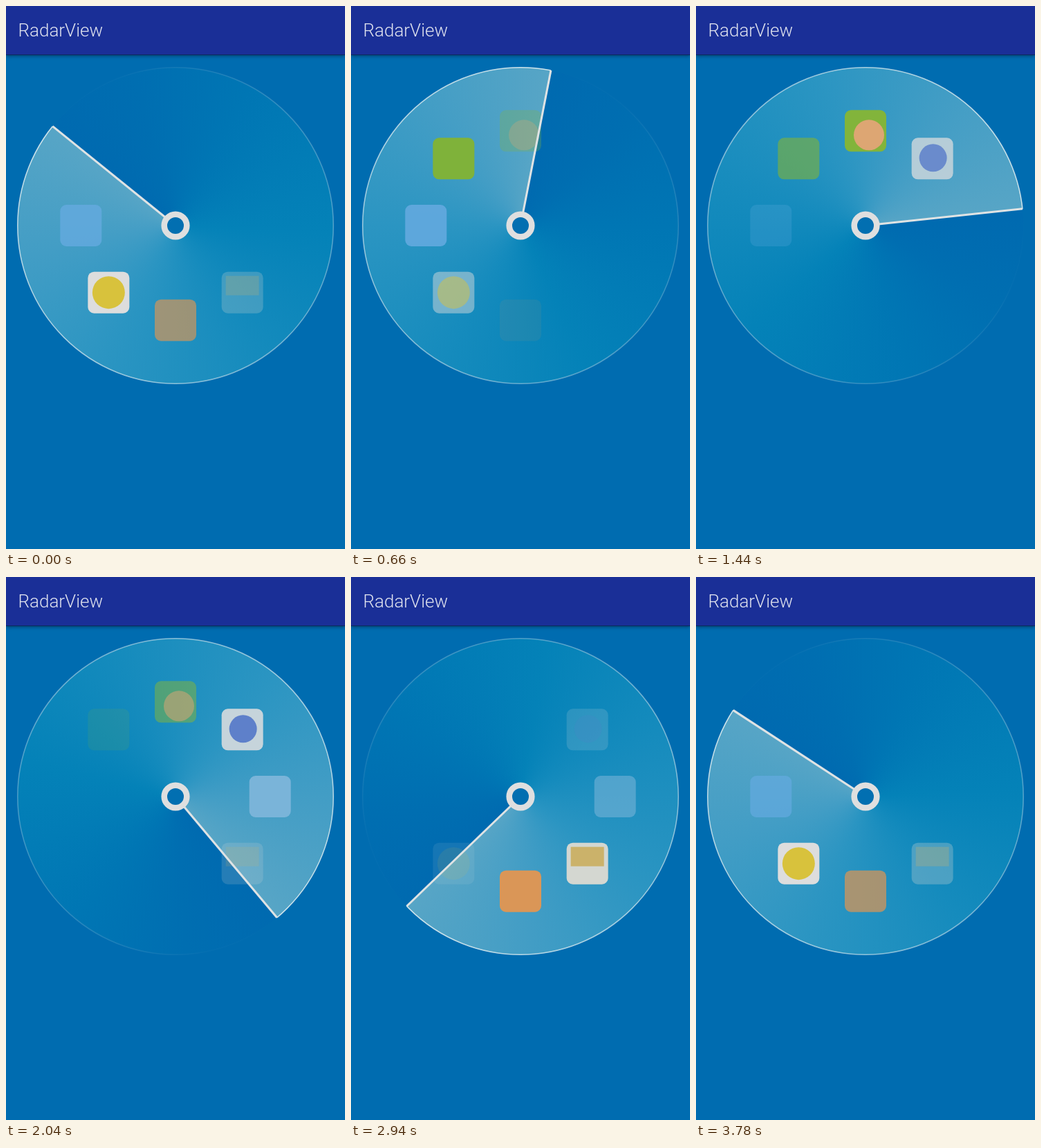
Animation, 490 px wide and 784 px high, one loop 3.84 s. Source, as an HTML page with a canvas:

```html
<!DOCTYPE html>
<html lang="en">
<head>
<meta charset="utf-8">
<title>RadarView</title>
<style>
  html, body { margin: 0; width: 100%; height: 100%; overflow: hidden; background: #006cb0; }
  #stage { position: relative; width: 490px; height: 784px; overflow: hidden; }
  canvas { position: absolute; left: 0; top: 0; }
  header {
    position: absolute; left: 0; top: 0; width: 490px; height: 70px;
    background: #1a2f97; border-bottom: 1px solid #0b2a5c;
    box-shadow: 0 1px 5px rgba(0, 20, 50, .55);
  }
  h1 {
    position: absolute; left: 17.5px; top: 20px; margin: 0;
    font: 300 26px/31px Roboto, sans-serif; color: #dfe2ee; white-space: nowrap;
  }
</style>
</head>
<body>
<div id="stage">
  <canvas id="radar" width="490" height="784"></canvas>
  <header><h1>RadarView</h1></header>
</div>
<script>
const ctx = document.getElementById('radar').getContext('2d');
const LOOP = 3840, STEP = 60;
const CX = 245, CY = 317, R = 228.2;
const ORBIT = 136.7, TILE = 60;
const BG = '#006cb0';
const rad = deg => deg * Math.PI / 180;

// Sweep angle in degrees, clockwise from the right
const sweepKeys = [
  [0, 218.9], [660, 281.1], [1440, 353.9], [2040, 410], [2400, 444],
  [2940, 496.1], [3780, 573.1], [LOOP, 578.9]
];

// Offset 0 lies just ahead of the sweep, 1 just behind it
const fillStops = [
  [0, '#006ab0'], [.1, '#006eb1'], [.22, '#0076b4'], [.4, '#0482b8'],
  [.55, '#158bbd'], [.72, '#2b95c2'], [.86, '#429dc5'], [1, '#57a5c6']
];
const rimStops = [
  [0, 0], [.08, .02], [.25, .22], [.5, .48], [.75, .7], [1, .9]
].map(([o, a]) => [o, `rgba(225,238,240,${a})`]);

// Tiles every 45 degrees, each with at most one plain shape
const tiles = [
  { color: '#7cb5da' },
  { color: '#dedbd2', square: [-24, -24, 48, 28], mark: '#cbb065' },
  { color: '#e9964c' },
  { color: '#dddddd', circle: [0, 0, 23.5], mark: '#d8c23c' },
  { color: '#66abe1' },
  { color: '#7fb23a' },
  { color: '#82b43b', circle: [5, 6, 22], mark: '#dda673' },
  { color: '#d5dade', circle: [1, -1, 20], mark: '#5579c9' }
];

function sweepAt(t) {
  const i = sweepKeys.findIndex(k => k[0] > t);
  const [t0, a0] = sweepKeys[i - 1], [t1, a1] = sweepKeys[i];
  return a0 + (a1 - a0) * (t - t0) / (t1 - t0);
}

function conic(angle, stops) {
  const g = ctx.createConicGradient(rad(angle % 360), CX, CY);
  stops.forEach(([o, c]) => g.addColorStop(o, c));
  return g;
}

function circle(x, y, r) {
  ctx.beginPath();
  ctx.arc(x, y, r, 0, 2 * Math.PI);
}

// Fades in after the sweep has passed, then slowly out
function tileAlpha(behind) {
  return Math.max(0, Math.min(1, (behind + 4) / 55, (200 - behind) / 115));
}

function drawTile(tile, i, sweep) {
  const deg = i * 45;
  const behind = ((sweep - deg + 10) % 360 + 360) % 360 - 10;
  const alpha = tileAlpha(behind);
  if (!alpha) return;
  ctx.save();
  ctx.globalAlpha = alpha;
  ctx.translate(CX + ORBIT * Math.cos(rad(deg)), CY + ORBIT * Math.sin(rad(deg)));
  ctx.fillStyle = tile.color;
  ctx.beginPath();
  ctx.roundRect(-TILE / 2, -TILE / 2, TILE, TILE, 9);
  ctx.fill();
  ctx.fillStyle = tile.mark;
  if (tile.circle) {
    circle(...tile.circle);
    ctx.fill();
  }
  if (tile.square) ctx.fillRect(...tile.square);
  ctx.restore();
}

function draw(t) {
  const sweep = sweepAt(t);
  ctx.fillStyle = BG;
  ctx.fillRect(0, 0, 490, 784);

  circle(CX, CY, R);
  ctx.fillStyle = conic(sweep, fillStops);
  ctx.fill();
  ctx.strokeStyle = conic(sweep, rimStops);
  ctx.lineWidth = 1.5;
  ctx.stroke();

  tiles.forEach((tile, i) => drawTile(tile, i, sweep));

  ctx.strokeStyle = '#dfe3e4';
  ctx.lineWidth = 3;
  ctx.beginPath();
  ctx.moveTo(CX, CY);
  ctx.lineTo(CX + R * Math.cos(rad(sweep)), CY + R * Math.sin(rad(sweep)));
  ctx.stroke();

  circle(CX, CY, 16.3);
  ctx.fillStyle = '#026fb1';
  ctx.fill();
  ctx.strokeStyle = '#dfdfdf';
  ctx.lineWidth = 8.6;
  ctx.stroke();
}

const start = performance.now();
function tick() {
  const t = (performance.now() - start) % LOOP;
  draw(Math.floor(t / STEP) * STEP);
  requestAnimationFrame(tick);
}
tick();
</script>
</body>
</html>
```
